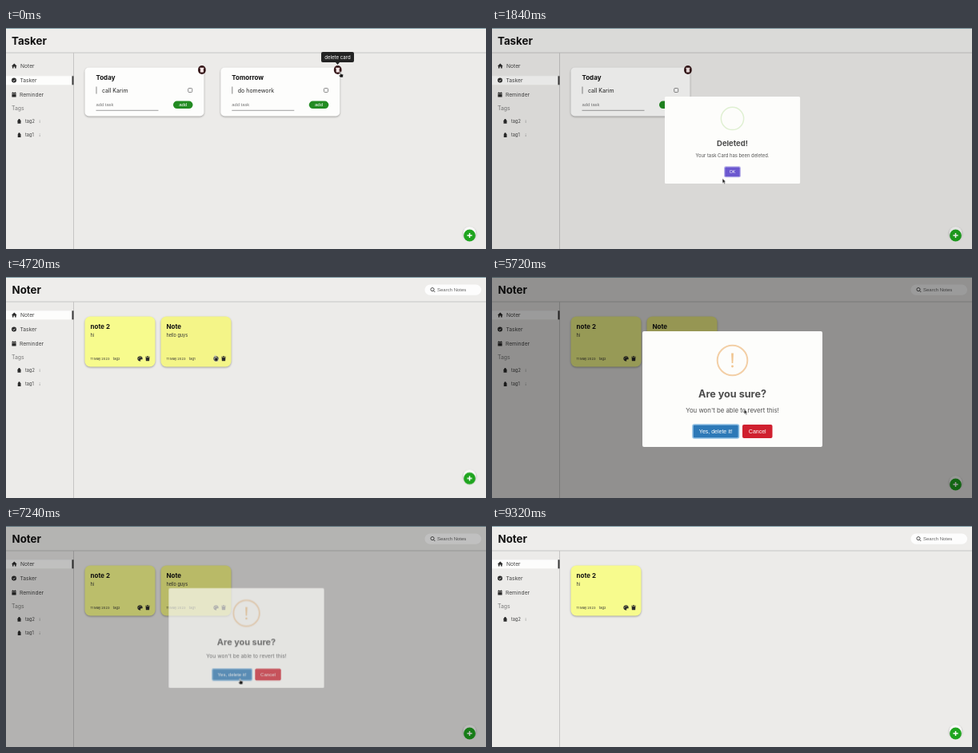
An HTML page that plays this animation: 600 px wide and 277 px high, repeating every 9.6 s.

```html
<!DOCTYPE html>
<html lang="en">
<head>
<meta charset="utf-8">
<title>Tasker</title>
<style>
html, body { margin: 0; width: 100%; height: 100%; overflow: hidden; background: #ecebe9; }
svg { display: block; width: 100vw; height: 100vh; }
text { font-family: Inter, "Open Sans", sans-serif; fill: #333; }
.ui { font-family: "Liberation Sans", Arial, sans-serif; }
.h1 { font-size: 13.3px; font-weight: 700; fill: #111; }
.h2 { font-size: 8px; font-weight: 700; fill: #111; }
.nav { font-size: 6.7px; fill: #444; }
.tag { font-size: 5.6px; fill: #444; }
.task { font-size: 7px; fill: #222; }
.date { font-size: 4.1px; }
.mid { text-anchor: middle; }
.icon { fill: #2b2b2b; }
.line { stroke: #c6c5c4; fill: none; }
.card { filter: drop-shadow(0 1px 1.2px rgba(0, 0, 0, .32)); }
.popup { transform-origin: 300.5px 140.5px; }
.popup .title { font-size: 12.6px; font-weight: 700; fill: #4c4c4c; }
.popup .body { font-size: 7.8px; fill: #545454; }
.popup .ui { font-size: 7px; fill: #fff; }
.ring, .mark { transform-origin: 300.5px 104.5px; }
.check { fill: none; stroke: #a5d886; stroke-width: 2.2; stroke-linecap: round; stroke-dasharray: 1 2; }
.cursor path { fill: #151515; stroke: #fff; stroke-width: .6; stroke-linejoin: round; }
</style>
</head>
<body>
<svg id="stage" viewBox="0 0 600 277" preserveAspectRatio="none"></svg>
<script>
const LOOP = 9600;
const stage = document.getElementById('stage');

const text = (x, y, cls, s) => `<text x="${x}" y="${y}" class="${cls}">${s}</text>`;
const box = (x, y, w, h, r, fill, more = '') =>
  `<rect x="${x}" y="${y}" width="${w}" height="${h}" rx="${r}" fill="${fill}" ${more}/>`;
const at = (x, y, body, more = '') => `<g transform="translate(${x} ${y})" ${more}>${body}</g>`;

const trash = '<path class="icon" d="M-2.8-2.6H-1L-.6-3.2H.6L1-2.6H2.8V-1.7H-2.8ZM-2.4-1.2H2.4L2.1 3H-2.1Z"/>';
const palette = '<circle class="icon" r="3.1"/><path fill="#f7fc8c" d="M.6 3.2Q0 1 1.6.9H3.2V3.2Z"/>' +
  [[-1.7, 0], [-.9, -1.5], [.9, -1.5]].map(([x, y]) => `<circle cx="${x}" cy="${y}" r=".5" fill="#f7fc8c"/>`).join('');

const tagRow = (y, name) => at(16.5, y,
  '<path class="icon" d="M-2-.8L-.6-3H.6L2-.8V2.8H-2Z"/>' +
  text(7.5, 2, 'tag', name) + '<path d="M25.7-.6V1.8M25.7-2V-1.4" stroke="#999" stroke-width=".7"/>',
  `id="${name}"`);

const taskCard = (x, id, title, task) => at(x, 0,
  box(0, 49.5, 149, 61, 5, '#fdfdfc', 'class="card"') +
  text(14, 64.5, 'h2', title) +
  '<path d="M14.5 73.5V82.5" stroke="#888"/>' + text(21.5, 80.6, 'task', task) +
  box(129.2, 75.5, 5, 5, 1, '#fff', 'stroke="#6d6d6d" stroke-width=".8"') +
  '<text x="14" y="98.2" class="ui" style="font-size:5.8px;fill:#777">add task</text>' +
  '<path d="M14 103.3H92" stroke="#888" stroke-width=".8"/>' +
  box(110.5, 91.5, 24.5, 9.6, 4.8, '#228b22') +
  '<text x="122.7" y="98.2" class="ui mid" style="font-size:6px;fill:#fff">add</text>' +
  box(141.6, 47, 9.6, 11, 4.8, '#351719') +
  '<path fill="#f6e6e6" d="M144-2.8" /><path fill="#f6e6e6" d="M143.9 49.7H148.9V51H148.4V55.4H144.4V51H143.9Z"/>',
  `id="${id}"`);

const noteCard = (x, id, fill, title, body, tag) => at(x, 0,
  box(0, 49.5, 88, 63, 7, fill, 'class="card"') +
  text(7, 64.8, 'h2', title) +
  `<text x="7" y="75.3" style="font-size:5.5px">${body}</text>` +
  text(7, 103.7, 'date', '11 May 2023') + text(35.3, 103.7, 'date', tag) +
  at(69, 102.3, palette) + at(78.5, 102.3, trash), `id="${id}"`);

const button = (x, w, fill, label, ring = 'none') =>
  box(x, 185, w, 17, 2, fill, `stroke="${ring}" stroke-width="1.6"`) +
  text(x + w / 2, 196, 'ui mid', label);

const popup = (id, icon, title, body, buttons) =>
  `<rect id="${id}-shade" width="600" height="277" fill="#000" fill-opacity=".39"/>
  <g id="${id}" class="popup">${box(188, 68, 225, 145, 2, '#fdfdfb')}${icon}
  ${text(300.5, 150.8, 'title mid', title)}${text(300.5, 169.6, 'body mid', body)}${buttons}</g>`;

const ring = color => `<circle class="ring" cx="300.5" cy="104.5" r="18.8" fill="none" stroke="${color}" stroke-width="2"/>`;
const ask = id => popup(id,
  ring('#f3cfa6') + '<g class="mark" fill="#f0c48e"><path d="M299.1 95.5H301.9L301.3 108H299.7Z"/><circle cx="300.5" cy="112" r="1.4"/></g>',
  'Are you sure?', "You won't be able to revert this!",
  button(251, 57.5, '#2d79b7', 'Yes, delete it!', '#8fbfe3') + button(313, 37.5, '#d0202f', 'Cancel'));
const done = (id, body, fill) => popup(id,
  ring('#dff0d2') + '<path class="check" pathLength="1" d="M290 104.7L297 111.7L312 97.2"/>',
  'Deleted!', body, button(287.5, 26, fill, 'OK', '#b9b2ea'));

stage.innerHTML = `
<rect width="600" height="277" fill="#ecebe9"/>
<rect width="600" height="30.5" fill="#eeedeb"/>
<rect width="600" height="1" fill="#7f9ba6"/>
<path class="line" d="M0 31H600M84.5 31V277"/>
<g id="active">${box(0, 42.3, 82.5, 11, 0, '#fdfdfc')}${box(82.5, 42.3, 2, 11, 0, '#3a3a3a')}</g>
${at(10.3, 47.8, '<path class="icon" d="M0-3.2L3.4 0H2.4V2.8H.8V.8H-.8V2.8H-2.4V0H-3.4Z"/>')}
${at(10, 65.6, '<circle class="icon" r="3"/><path d="M-1.4 0L-.3 1.1L1.5-.9" fill="none" stroke="#fff" stroke-width=".8"/>')}
${at(10, 83.4, '<path class="icon" d="M-2.6-2.4H-1.7V-3.2H-.9V-2.4H.9V-3.2H1.7V-2.4H2.6V-1.2H-2.6ZM-2.6-.7H2.6V3H-2.6Z"/>')}
${text(18, 50.2, 'nav', 'Noter')}${text(17.4, 68, 'nav', 'Tasker')}${text(17, 85.9, 'nav', 'Reminder')}
<text x="7" y="102.6" style="font-size:6.9px;fill:#7a7a7a">Tags</text>
${tagRow(117, 'tag2')}${tagRow(134.3, 'tag1')}

<g id="tasker">
  ${text(7, 20.6, 'h1', 'Tasker')}
  ${taskCard(98.5, 'today', 'Today', 'call Karim')}
  ${taskCard(268.3, 'tomorrow', 'Tomorrow', 'do homework')}
  <g id="tip">${box(394, 30, 41, 13, 2, '#232323')}<path d="M412 43H417L414.5 46Z" fill="#232323"/>
  <text x="414.5" y="38.7" class="mid" style="font-size:6.1px;fill:#fff">delete card</text></g>
</g>

<g id="noter">
  ${text(7.5, 20.6, 'h1', 'Noter')}
  ${box(523.5, 9.5, 70.5, 13.3, 6.6, '#fdfdfd')}
  <path d="M534.7 17.4L536.3 19" stroke="#444"/><circle cx="533" cy="15.6" r="2.1" fill="none" stroke="#444" stroke-width=".9"/>
  <text x="539" y="18.3" class="ui" style="font-size:6px;fill:#666">Search Notes</text>
  ${noteCard(98.5, 'note2', '#f7fb8d', 'note 2', 'hi', 'tag2')}
  ${noteCard(193.5, 'note1', '#f4f588', 'Note', 'hello guys', 'tag1')}
</g>

<g id="fab">
  <circle class="card" cx="579.5" cy="257" r="8" fill="#f8f8f7"/>
  <circle cx="579.5" cy="260" r="7.4" fill="#1fa51f"/>
  <path d="M576.4 260H582.6M579.5 256.9V263.1" stroke="#fff" stroke-width="1.5"/>
</g>

${ask('ask1')}${done('done1', 'Your task Card has been deleted.', '#6b58cf')}
${ask('ask2')}${done('done2', 'Your Note has been deleted.', '#5c49b4')}

<g id="cursor" class="cursor">
  <path id="arrow" d="M0 0V6.2L1.5 4.9L2.5 7.2L3.6 6.7L2.6 4.5H4.5Z"/>
  <path id="hand" d="M-.6 0Q0-.6.6 0V2.6L3.2 3.1Q3.8 3.3 3.7 4L3.2 7H-.3L-2 4.4Q-1.8 3.6-.6 4.3Z"/>
</g>`;

// Turns [ms, css] steps into a CSS keyframe animation over the whole loop.
const sheet = document.head.appendChild(document.createElement('style')).sheet;
let count = 0;
function play(selector, steps, ease = 'linear') {
  const name = 'k' + count++;
  const all = [...steps, [LOOP, steps[steps.length - 1][1]]];
  sheet.insertRule(`@keyframes ${name}{${all.map(([ms, css]) => `${ms / LOOP * 100}%{${css}}`).join('')}}`);
  sheet.insertRule(`${selector}{animation:${name} ${LOOP}ms ${ease} infinite}`);
}

// Visible first or not, then flipped at each given time.
function toggle(selector, shown, ...times) {
  play(selector, [0, ...times].map((ms, i) => [ms, `opacity:${(i % 2 === 0) === shown ? 1 : 0}`]), 'step-end');
}

function showPopup(id, open, close) {
  const pose = (s, o = 1) => `opacity:${o};transform:scale(${s})`;
  play('#' + id, [
    [0, pose(.7, 0)], [open, pose(.7, 0)], [open + 1, pose(.7)],
    [open + 135, pose(1.05)], [open + 240, pose(.95)], [open + 300, pose(1)],
    [close, pose(1)], [close + 85, pose(.717, .3)], [close + 150, pose(.5, 0)]]);
  play(`#${id}-shade`, [
    [0, 'opacity:0'], [open, 'opacity:0'], [open + 100, 'opacity:1'],
    [close, 'opacity:1'], [close + 110, 'opacity:0']]);
}

function showAsk(id, open, close) {
  showPopup(id, open, close);
  const flip = 'opacity:0;transform:scaleY(.05)';
  play(`#${id} .ring`, [[0, flip], [open, flip], [open + 500, 'opacity:1;transform:scaleY(1)']]);
  const turn = (deg, o) => `opacity:${o};transform:rotate(${deg}deg)`;
  play(`#${id} .mark`, [[0, turn(45, 0)], [open, turn(45, 0)], [open + 125, turn(-25, .4)],
    [open + 250, turn(15, .8)], [open + 375, turn(-5, 1)], [open + 500, turn(0, 1)]]);
}

function showDone(id, open, close) {
  showPopup(id, open, close);
  const hidden = 'stroke-dashoffset:1.1';
  play(`#${id} .check`, [[0, hidden], [open + 350, hidden], [open + 640, 'stroke-dashoffset:0']]);
}

showAsk('ask1', 240, 1500);
showDone('done1', 1820, 2793);
showAsk('ask2', 5120, 7200);
showDone('done2', 7360, 8400);

const PAGE = 3900;
toggle('#tasker', true, PAGE);
toggle('#noter', false, PAGE);
toggle('#tip', true, 300);
toggle('#tomorrow', true, 1700);
toggle('#note1', true, 7340);
toggle('#tag1', true, 7340);
play('#active', [[0, 'transform:translateY(17.9px)'], [PAGE, 'transform:none']], 'step-end');
play('#fab', [[0, 'transform:translateY(0)'], [4500, 'transform:translateY(0)'],
  [4720, 'transform:translateY(-7.6px)'], [4920, 'transform:translateY(0)']], 'ease-in-out');

const path = [
  [0, 418, 55], [260, 418, 55], [1000, 281, 191], [1500, 281, 191], [1840, 288, 188.5],
  [2300, 301, 188.5], [3150, 301, 188.5], [3750, 30, 48], [4000, 30, 48], [4720, 261.5, 98.5],
  [4920, 271, 100], [5150, 271, 100], [6080, 335, 195], [6500, 292.5, 191.5], [7250, 292.5, 191.5],
  [7900, 297.5, 193.5], [8450, 297.5, 193.5], [8800, 360, 95], [9250, 440, -12]];
play('#cursor', path.map(([ms, x, y]) => [ms, `transform:translate(${x}px,${y}px)`]), 'ease-in-out');

const handTimes = [300, 900, 1600, 3650, 4100, 4650, 5150, 5950, 7250, 7800, 8450];
toggle('#hand', true, ...handTimes);
toggle('#arrow', false, ...handTimes);
</script>
</body>
</html>
```
